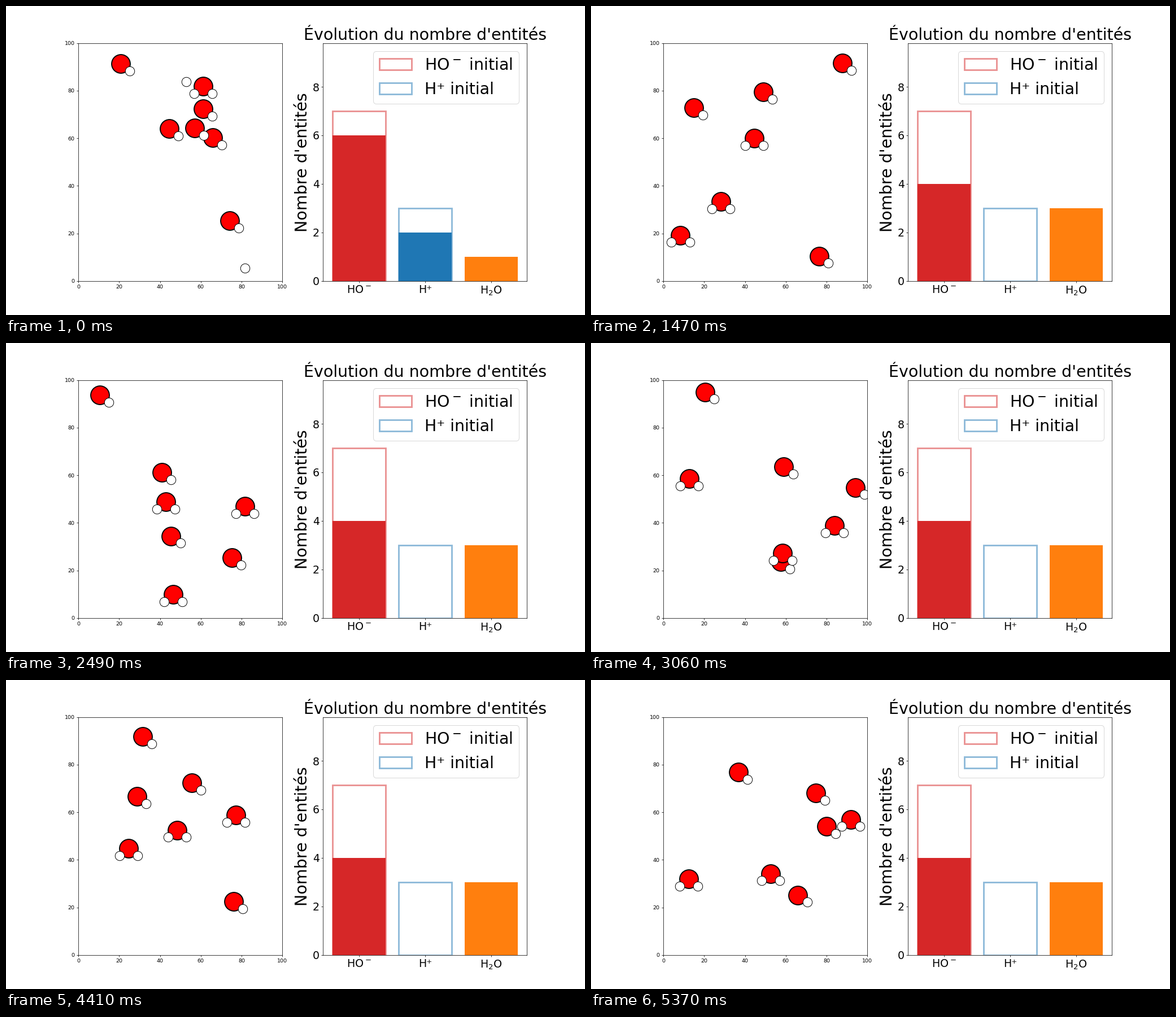
Animation of 1025 by 547 pixels, one loop 5.4 s. Source, as a matplotlib script:

```python
import matplotlib.pyplot as plt
import numpy as np
from matplotlib.animation import FuncAnimation

FRAMES, INTERVAL = 180, 30
DPI = 547 / 8
STEP = 3.0          # spread of one random step, in axis units
LOW, HIGH = 5, 95   # molecules stay inside the box
H_OFFSET = np.array([4.5, -3.0])

rng = np.random.default_rng(8)

# Places each oxygen wanders through, at these frames.
KEYS = [0, 19, 49, 83, 123, 147, 179]
STOPS = np.array([
    [(20.7, 91.3), (26.7, 58.8), (14.9, 72.8), (10.5, 93.7), (20.2, 76.8), (31.5, 91.8), (36.8, 76.8)],
    [(44.6, 64.0), (44.7, 48.8), (76.3, 10.5), (75.3, 25.3), (68.5, 48.5), (28.8, 66.6), (74.7, 68.1)],
    [(61.2, 72.4), (77.0, 81.0), (87.8, 91.6), (41.0, 61.1), (80.8, 63.9), (55.6, 72.3), (80.0, 54.1)],
    [(57.0, 64.2), (50.0, 86.8), (49.0, 79.5), (45.5, 34.5), (41.0, 12.9), (76.1, 22.5), (66.0, 25.2)],
    [(65.9, 60.2), (39.3, 29.6), (8.4, 19.3), (46.5, 9.9), (58.3, 58.2), (48.4, 52.5), (52.6, 34.2)],
    [(74.2, 25.3), (93.6, 22.7), (44.6, 60.0), (81.7, 46.9), (89.1, 49.1), (77.2, 58.8), (91.9, 57.0)],
    [(61.2, 81.8), (57.7, 37.4), (28.2, 33.4), (42.9, 48.8), (17.4, 56.0), (24.6, 44.8), (12.4, 32.0)],
])

# Frame at which an oxygen (by row) takes up its second hydrogen.
REACTION = {6: 0, 4: 8, 5: 11}
FREE_IONS = {4: (53.0, 83.7), 5: (81.8, 5.4)}


def wander(start, end, n):
    """Random walk of n steps that leaves start and arrives at end."""
    start, end = np.array(start), np.array(end)
    walk = rng.normal(0, STEP, (n, 2)).cumsum(axis=0)
    t = np.arange(1, n + 1)[:, None] / n
    path = start + walk + t * (end - start - walk[-1])
    return np.clip(np.vstack([start, path]), LOW, HIGH)


def full_path(stops):
    legs = [wander(a, b, k1 - k0)[1:]
            for a, b, k0, k1 in zip(stops, stops[1:], KEYS, KEYS[1:])]
    return np.vstack([stops[:1], *legs])


oxygens = np.array([full_path(stops) for stops in STOPS])
ions = {row: wander(start, oxygens[row, REACTION[row]], REACTION[row])
        for row, start in FREE_IONS.items()}

fig, (box, chart) = plt.subplots(1, 2, figsize=(1025 / DPI, 547 / DPI), dpi=DPI)

box.set(xlim=(0, 100), ylim=(0, 100))
oxygen_dots = box.scatter([], [], s=1200, c="red", edgecolors="black", linewidths=2)
hydrogen_dots = box.scatter([], [], s=300, c="white", edgecolors="black", linewidths=1)

HYDROXIDE, PROTON, WATER = "HO$^-$", "H⁺", "H$_2$O"
for x, count, color, name in [(0, 7, "tab:red", HYDROXIDE), (1, 3, "tab:blue", PROTON)]:
    chart.bar(x, count, fill=False, edgecolor=color, linewidth=3, alpha=0.5,
              label=f"{name} initial")
bars = chart.bar(range(3), [7, 3, 0], color=["tab:red", "tab:blue", "tab:orange"])
chart.set(xlim=(-0.54, 2.54), ylim=(0, 9.8), yticks=range(0, 9, 2))
chart.set_xticks(range(3), [HYDROXIDE, PROTON, WATER])
chart.tick_params(labelsize=20)
chart.set_title("Évolution du nombre d'entités", fontsize=30)
chart.set_ylabel("Nombre d'entités", fontsize=30)
chart.legend(fontsize=30, loc="upper right")


def update(frame):
    centers = oxygens[:, frame]
    reacted = [row for row, start in REACTION.items() if frame >= start]
    free = [path[frame] for row, path in ions.items() if row not in reacted]
    second = centers[reacted] + H_OFFSET * (-1, 1)
    oxygen_dots.set_offsets(centers)
    hydrogen_dots.set_offsets(np.vstack([centers + H_OFFSET, second, *free]))

    water = len(reacted)
    for bar, height in zip(bars, (7 - water, 3 - water, water)):
        bar.set_height(height)
    return oxygen_dots, hydrogen_dots, *bars


animation = FuncAnimation(fig, update, frames=FRAMES, interval=INTERVAL, repeat=True)
plt.show()
```
